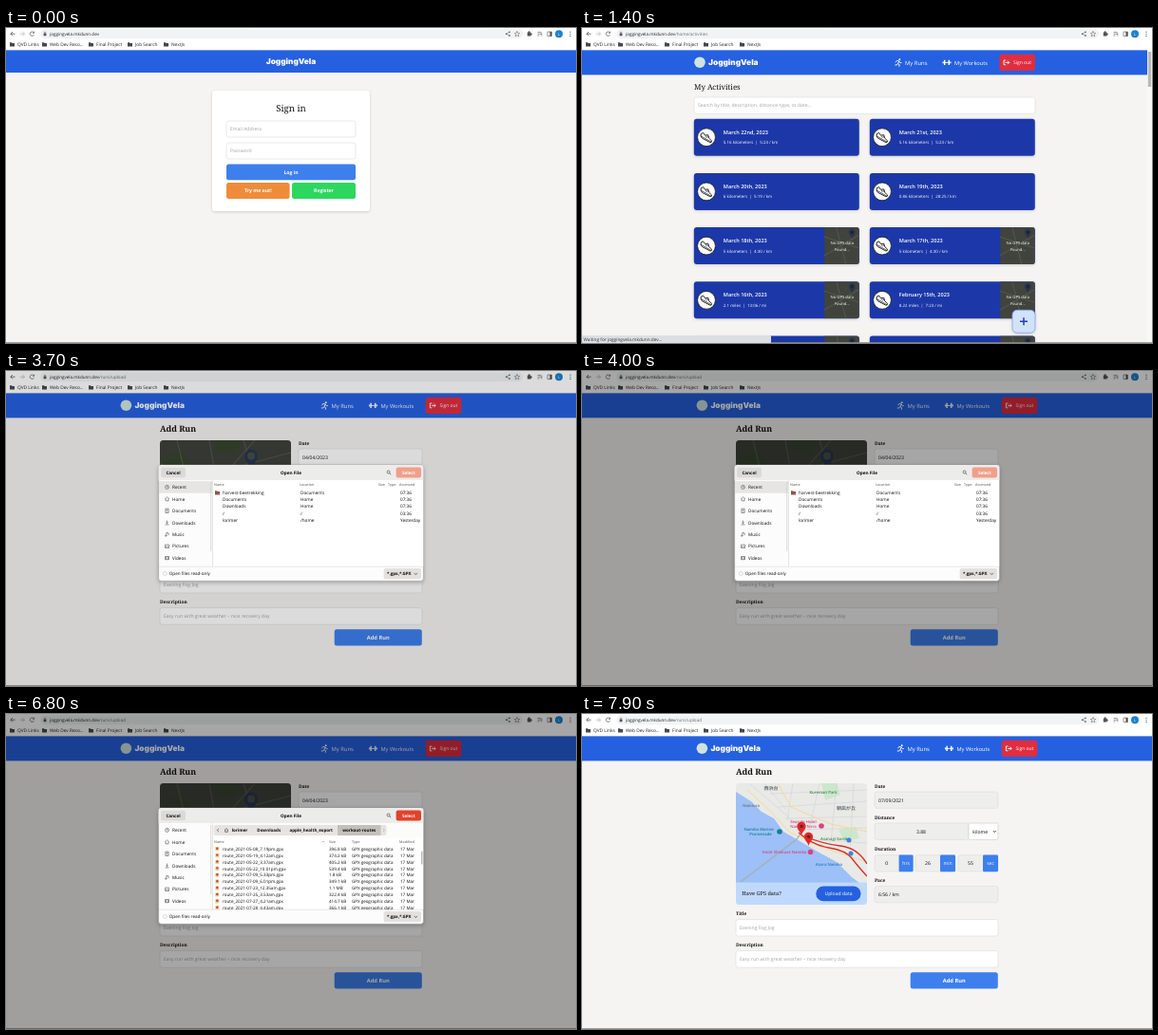
These frames come from a looping animation (600x332 px, 8 s). An HTML page:

```html
<!DOCTYPE html>
<html lang="en">
<head>
<meta charset="utf-8">
<style>
  html, body { margin: 0; width: 100%; height: 100%; overflow: hidden; background: #fff; }
  svg { display: block; width: 600px; height: 332px; }
  text { font-family: "Open Sans", "Noto Sans", "Noto Sans CJK JP", sans-serif; white-space: pre; text-rendering: geometricPrecision; }
  #dialog text { font-weight: 500; }
  .serif { font-family: "Noto Serif", serif; }
  .brand { font-family: Inter, sans-serif; font-weight: 900; }
  text.bold, #dialog text.bold { font-weight: 700; }
  text.semi, #dialog text.semi { font-weight: 600; }
  .mid { text-anchor: middle; }
</style>
</head>
<body>
<svg id="stage" viewBox="0 0 600 332"></svg>
<script>
const HOST = 'joggingvela.mkdunn.dev', BRAND = 'JoggingVela', USER = 'lorimer';
const BLUE = '#2560e0', SKY = '#3e7fee', GREY = '#a0a3a8', INK = '#0c0c0c';

const text = (x, y, s, size = 5.06, fill = INK, cls = '') =>
  `<text x="${x}" y="${y}" font-size="${size}" fill="${fill}" class="${cls}">${s}</text>`;
const rect = (x, y, x2, y2, fill, r = 0, extra = '') =>
  `<rect x="${x}" y="${y}" width="${x2 - x}" height="${y2 - y}" rx="${r}" fill="${fill}" ${extra}/>`;
const circle = (x, y, r, fill, extra = '') => `<circle cx="${x}" cy="${y}" r="${r}" fill="${fill}" ${extra}/>`;
const line = (d, color, w = .8, extra = '') =>
  `<path d="${d}" fill="none" stroke="${color}" stroke-width="${w}" ${extra}/>`;
const shape = (d, fill, extra = '') => `<path d="${d}" fill="${fill}" ${extra}/>`;
const at = (x, y, body) => `<g transform="translate(${x} ${y})">${body}</g>`;
const group = (id, body, extra = '') => `<g id="${id}" ${extra}>${body}</g>`;
const field = (x, y, x2, y2, fill = '#fff') => rect(x, y, x2, y2, fill, 2.5, 'stroke="#d9dbde" stroke-width=".6"');
const button = (x, y, x2, y2, fill, label, size = 5.1, cls = 'bold') =>
  rect(x, y, x2, y2, fill, 2.5) + text((x + x2) / 2, (y + y2) / 2 + size * .36, label, size, '#fff', cls + ' mid');
const folder = (x, y, fill = '#8a5a4c') => shape(`M${x} ${y}h2l.7.8h2.3v3.4h-5z`, fill);
const pin = (x, y, fill, s = 1) =>
  at(x, y, `<g transform="scale(${s})">${shape('M0 0C-1-4-4-5-4-8.5A4 4 0 0 1 4-8.5C4-5 1-4 0 0', fill)}${circle(0, -8.5, 1.6, '#0006')}</g>`);

// Browser frame
function browser() {
  const dark = '#50545a';
  const marks = [[4, 'QVD Links'], [38, 'Web Dev Reso…'], [87, 'Final Project'], [128, 'Job Search'], [166, 'NextJs']];
  return rect(0, 0, 600, 23, '#fff') + rect(36, 1.3, 544, 11.2, '#f1f3f4', 5)
    + line('M9.5 6.2H4.8M7 4L4.8 6.2L7 8.4', dark) + line('M14.8 6.2h4.7M17.3 4l2.2 2.2l-2.2 2.2', '#b4b6b9')
    + line('M29.2 4.8A2.2 2.2 0 1 0 29.5 7M29.7 3.6v1.7h-1.7', dark, .7)
    + rect(39.6, 5.6, 42.4, 8.3, dark, .4) + line('M40.2 5.8V4.9a.8.8 0 0 1 1.6 0v.9', dark, .5)
    + `<text x="46" y="8" font-size="4.6" fill="#222">${HOST}<tspan id="path" fill="#6b6f74"></tspan></text>`
    + line('M530 4.3L526.6 6.2L530 8.1', dark, .5) + circle(530, 4.3, .8, dark) + circle(526.6, 6.2, .8, dark) + circle(530, 8.1, .8, dark)
    + line('M538 3.4l.8 1.9l2 .2l-1.5 1.3l.5 2l-1.8-1.1l-1.8 1.1l.5-2l-1.5-1.3l2-.2z', dark, .5)
    + rect(548.8, 4.6, 552.6, 8.6, dark, .5) + circle(550.6, 4.2, 1, dark) + circle(552.8, 6.6, 1, dark)
    + line('M559.5 4.4h4M559.5 6.2h4M559.5 8h2M563.8 5v3.4', dark, .6)
    + line('M570 4h4.4v4.6H570z', dark, .6) + rect(572.4, 4, 574.4, 8.6, dark)
    + circle(582, 6.3, 4, '#1a82cf') + text(582, 7.7, 'L', 4, '#fff', 'mid')
    + [4.2, 6.3, 8.4].map(y => circle(594, y, .6, dark)).join('')
    + marks.map(([x, s]) => folder(x, 15.2, '#454a50') + text(x + 8, 18.9, s, 4.8, '#222')).join('');
}

function header(dx) {
  const w = '#fff';
  const runner = circle(1.3, -3.2, 1, w) + line('M-3 -.2L-1.6 -2L.8 -1.4L-.6 1.2L1.2 2.2L.8 4.4M-.6 1.2L-1.6 2.6H-3.6M.8 -1.4L1.8 .2H3.4', w, .9);
  const bell = line('M-4 -1v2M4 -1v2M-4 0H4', w, .9) + line('M-2.3 -2.6v5.2M2.3 -2.6v5.2', w, 1.5);
  const exit = line('M-1 -2.4H-3V2.4H-1M-1.5 0H2.6M1 -1.8L2.8 0L1 1.8', w, .9);
  return rect(0, 23.4, 600, 49.4, BLUE) + at(dx, 0,
    circle(124, 36.2, 5.8, '#cfe4de') + text(133, 39.3, BRAND, 8.3, w, 'brand')
    + at(333, 36.4, runner) + text(340, 38.6, 'My Runs', 5.9, w)
    + at(384, 36.4, bell) + text(392, 38.6, 'My Workouts', 5.7, w)
    + rect(439.3, 27.8, 477, 45, '#e02d3f', 3) + at(447, 36.4, exit) + text(454, 38.2, 'Sign out', 5, w));
}

function login() {
  return rect(0, 23.4, 600, 47, BLUE) + text(300, 38.3, BRAND, 8.3, '#fff', 'brand mid')
    + rect(217, 66, 383, 193, '#fff', 3.5, 'filter="url(#soft)"')
    + text(300, 88, 'Sign in', 9.6, '#111', 'serif mid')
    + field(232, 98, 368, 115) + text(236, 108.4, 'Email Address', 5.06, GREY)
    + field(232, 121, 368, 138) + text(236, 131.4, 'Password', 5.06, GREY)
    + button(232, 143.5, 368, 160.3, SKY, 'Log in') + button(232, 163, 298.6, 180, '#ee8c3c', 'Try me out!')
    + button(301, 163, 368, 180, '#2dd75f', 'Register');
}

function activityCard(x, y, [date, detail, noGps]) {
  const shoe = shape('M-6.5 -1.5L-4.5 -3.2L-2 -1.2L1 -2.6L3 .4L6.5 2Q7.2 4 5.4 4.2L-4 2.6Q-6.6 1.4 -6.5 -1.5Z', '#fff', 'stroke="#111" stroke-width=".8"')
    + line('M-6 .8L6.5 3.4M-1 -.8L.6 .8M.4 -1.6L2 0', '#111', .6);
  const map = rect(137.5, 0, 174, 39, '#41433d') + line('M137 10L174 22M150 0L160 39M137 30L174 8', '#52544a', 1.2)
    + pin(166.5, 12, '#26334e', .8)
    + text(156, 18, 'No GPS data', 4.2, '#fff', 'mid') + text(156, 24.6, 'Found...', 4.2, '#fff', 'mid');
  return at(x, y, rect(0, 0, 174, 39, '#1f39a8', 3, 'filter="url(#soft)"')
    + (noGps ? `<g clip-path="url(#card)">${map}</g>` : '')
    + circle(13.2, 19.5, 9.4, '#fff', 'stroke="#111" stroke-width=".7"') + at(13.2, 19.2, `<g transform="rotate(18)">${shoe}</g>`)
    + text(31, 16.2, date, 5.55, '#fff', 'semi') + text(31, 26.6, detail, 4.4, '#fff'));
}

function activities() {
  const cards = [
    ['March 22nd, 2023', '5.16 kilometers  |  5:23 / km'], ['March 21st, 2023', '5.16 kilometers  |  5:23 / km'],
    ['March 20th, 2023', '6 kilometers  |  5:19 / km'], ['March 19th, 2023', '0.86 kilometers  |  28:25 / km'],
    ['March 18th, 2023', '5 kilometers  |  4:30 / km', 1], ['March 17th, 2023', '5 kilometers  |  4:30 / km', 1],
    ['March 16th, 2023', '2.1 miles  |  13:06 / mi', 1], ['February 15th, 2023', '8.22 miles  |  7:23 / mi', 1],
    ['', '', 1], ['', '', 1]];
  return header(0) + text(118, 65, 'My Activities', 7.9, '#111', 'serif')
    + field(118, 73, 477, 90.3) + text(122, 83.4, 'Search by title, description, distance-type, or date...', 5.06, GREY)
    + cards.map((c, i) => activityCard(i % 2 ? 302.8 : 117.8, 95.7 + (i >> 1) * 57.2, c)).join('')
    + rect(453, 297.3, 477, 321.3, '#d2e2fb', 5, 'stroke="#7fa3e6" stroke-width=".8" filter="url(#soft)"')
    + line('M461 309.3h8M465 305.3v8', '#1f3fae', 1.5)
    + rect(595, 23, 600, 332, '#f8f8f8') + rect(595.8, 25, 599.2, 62, '#b9b9b9');
}

function darkMap() {
  return rect(162, 73, 300, 178, '#3e403a')
    + shape('M162 92L186 84L200 104L176 116ZM262 120l30-12l8 26l-30 8ZM222 73h26l-6 14l-22-2Z', '#37442f')
    + line('M162 152Q184 138 196 152T226 156T250 166T300 150', '#29394c', 8)
    + line('M162 122L300 86M180 73L206 178M214 73L232 178M250 73L282 178M162 98L300 142M168 178L262 73M162 140L300 168', '#55574c', 1.1)
    + line('M258 101L246 108L234 106L227 118L229 134L215 144', '#8c2a24', 1.4) + pin(258, 104, '#263552', 1.7)
    + circle(258, 89.6, 4, '#4a4c46')
    + text(231, 128.2, 'No GPS data found...', 6, '#fff', 'mid');
}

function cityMap() {
  const label = (x, y, s, fill, size = 4.2) => text(x, y, s, size, fill, 'semi mid');
  const pink = '#d6447f', teal = '#13808f', slate = '#6b7077';
  return rect(162, 73, 300, 178, '#e9e9e5')
    + shape('M252 73h16l4 12l-16 6ZM270 122l18-3l4 12l-16 3Z', '#cbe8ca')
    + line('M176 73L240 128M192 73L214 100M222 73L216 112M250 73L238 128M268 73L262 136M286 73L282 146M198 84L300 80M206 98L300 92M214 110L300 108M226 122L300 120M240 132L300 136', '#d3d6da', .7)
    + shape('M162 82L178 92L189 103L202 110L212 124L226 132L246 144L268 156L284 172L292 178H162Z', '#9cc0f7')
    + line('M174 80L198 102L218 124L246 138L300 156M206 73L220 98L262 116L300 124', '#f3d99a', 1)
    + line('M234 120L226 132L167 177', '#a9adb0', 1.2)
    + line('M228 125Q242 138 260 141T284 152T300 171M231 128Q254 137 272 139T300 158', '#d3322b', 1.3)
    + label(199, 80, '西浜台', slate, 5) + label(254, 84, 'Kuremari Park', '#3b8a4b') + label(278, 101, '朝凪が丘', slate, 5)
    + label(178, 98, 'Namiura', slate) + label(186, 123, 'Namiko Marine', teal) + label(188, 128, 'Promenade', teal)
    + circle(208, 124, 2.8, teal) + label(233, 115, 'Seaside Hotel', pink) + label(233, 120, 'Namiko Terra', pink)
    + circle(252, 118, 2.8, pink) + label(267, 133, 'Asanagi Garden', '#3b8a4b') + circle(281, 133, 2.5, '#4b7fd6')
    + label(213, 147, 'Hotel Shiokaze Namiko', pink) + circle(240.5, 145.5, 2.8, pink)
    + label(260, 160, 'Azora Namiko', '#2f78c4') + circle(283, 147, 2.5, '#3f86d8')
    + pin(231, 128, '#dc2a2a', 1.15) + pin(238.5, 139, '#dc2a2a', 1.15);
}

function runForm(done) {
  const bg = done ? '#eeeeec' : '#fff', ink = done ? INK : GREY;
  const label = (x, y, s) => text(x, y, s, 4.85, '#111', 'serif semi');
  const units = [[308, 333.6, 348.6, 'hrs', done ? '0' : '00'], [351, 377, 393, 'min', done ? '26' : '40'], [396, 422, 438, 'sec', done ? '55' : '00']];
  return `<g clip-path="url(#mapCard)">${done ? cityMap() : darkMap()}${rect(162, 177.6, 300, 201, '#bfd9fc')}</g>`
    + text(168.3, 191.2, 'Have GPS data?', 5.6, '#111', 'serif')
    + rect(246.3, 181.5, 293.5, 197.3, BLUE, 7.9) + text(270, 191.2, 'Upload data', 5.1, '#fff', 'mid')
    + label(308, 77.5, 'Date') + field(308, 82, 438, 99.3, bg) + text(312, 92.6, done ? '07/09/2021' : '04/04/2023')
    + label(308, 110.5, 'Distance') + field(308, 115, 407, 132.4, bg) + text(357, 125.6, done ? '3.88' : '0.00', 5.06, ink, 'mid')
    + rect(407, 115, 438, 132.4, '#fff', 1.5, `stroke="${done ? '#c4c8ca' : '#6f8580'}" stroke-width=".6"`)
    + text(411.3, 125.6, done ? 'kilome' : 'miles') + line('M432.8 123l1.5 1.6l1.5-1.6', '#222', .8)
    + label(308, 143.5, 'Duration')
    + units.map(([x, m, x2, unit, v]) => field(x, 148.7, x2, 166, bg) + rect(m, 148.4, x2, 166.2, SKY, 1.2)
      + text((x + m) / 2, 159.2, v, 5.06, ink, 'mid') + text((m + x2) / 2, 159.2, unit, 5.06, '#fff', 'mid')).join('')
    + label(308, 176.6, 'Pace') + field(308, 181.4, 438, 198.8, bg) + text(312, 192, done ? '6:56 / km' : '0:00 / mi')
    + label(162, 211.6, 'Title') + field(162, 216.5, 438, 234) + text(166, 227, 'Evening Fog Jog', 5.06, GREY)
    + label(162, 244.8, 'Description') + field(162, 249.6, 438, 267.2)
    + text(166, 260.2, 'Easy run with great weather – nice recovery day', 5.06, GREY)
    + button(345.7, 272.2, 437.8, 289.4, SKY, 'Add Run', 5.7);
}

// File chooser
function dialogShell() {
  const places = ['Recent', 'Home', 'Documents', 'Downloads', 'Music', 'Pictures', 'Videos'];
  const icons = ['M-2 0a2 2 0 1 0 4 0a2 2 0 1 0-4 0M0-1.2V0H1', 'M-2.2 0L0-2L2.2 0M-1.5-.4V2H1.5V-.4', 'M-1.6-2.2H1.6V2.2H-1.6ZM-.8-.8H.8M-.8.6H.8',
    'M0-2.2V1M-1.3-.2L0 1L1.3-.2M-2 2.2H2', 'M-.6 1.5V-2L1.6-1.4V1M-.6 1.4a.7.7 0 1 0-1.4 0a.7.7 0 1 0 1.4 0', 'M-2-1.6H2V1.8H-2ZM-1.6 1.4L0-.2L1.6 1.4', 'M-2-1.6H2V1.6H-2ZM-1-1.6V1.6M1-1.6V1.6'];
  return rect(160.6, 99, 439.4, 221.3, '#fcfcfc', 3, 'stroke="#8a8a8a" stroke-width=".5" filter="url(#deep)"')
    + shape('M160.6 115V102a3 3 0 0 1 3-3H436.4a3 3 0 0 1 3 3V115Z', '#ececea')
    + rect(163, 101.8, 189, 112.3, '#dcdad8', 2) + text(176, 108.7, 'Cancel', 4.6, INK, 'bold mid')
    + text(300, 108.8, 'Open File', 4.7, INK, 'bold mid')
    + circle(402.6, 106.5, 1.5, 'none', 'stroke="#333" stroke-width=".6"') + line('M403.7 107.7l1.5 1.5', '#333', .7)
    + `<rect id="select" x="410.6" y="101.6" width="26.4" height="10.9" rx="2"/>` + text(423.8, 108.8, 'Select', 4.6, '#fff', 'bold mid')
    + `<rect id="place" x="161" width="56" height="12.6" fill="#e6e5e4"/>`
    + places.map((s, i) => line(icons[i], '#555', .6, `transform="translate(169.5 ${122.4 + i * 12.45})"`) + text(175, 124.2 + i * 12.45, s, 4.7)).join('')
    + rect(215.4, 117, 216.2, 190, '#cfcfcf', .4) + rect(217.5, 115, 439.2, 206, '#fff') + line('M217.5 115V206M161 206.2H439', '#d0cecb', .5)
    + rect(165.6, 211.7, 169, 215.1, '#fff', .8, 'stroke="#bbb" stroke-width=".5"') + text(171.8, 215.1, 'Open files read-only', 4.6)
    + rect(397.6, 208, 437, 219.3, '#e3e1df', 2) + text(401, 215.2, '*.gpx,*.GPX', 4.5, INK, 'bold') + line('M429.6 212.9l1.7 1.7l1.7-1.7', '#333', .7);
}

const columns = (y, cols) => cols.map(([x, s]) => text(x, y, s, 3.7, '#777', 'semi')).join('');

function crumbs(items) {
  const end = items[items.length - 1][1];
  return rect(218, 115, 439, 130.5, '#fbfbfa') + rect(218.5, 117, end + 6, 128, '#e6e4e2', 2)
    + line('M224 120.8l-1.7 1.7l1.7 1.7', '#333', .6) + line(`M${end + 2.4} 120.8l1.7 1.7l-1.7 1.7`, '#aaa', .6)
    + line('M230 122.5L232 120.6L234 122.5M230.7 122v2.3H233.3V122', '#333', .6)
    + items.map(([x, x2, s], i) => (i === items.length - 1 ? rect(x, 117, x2, 128, '#c3c0bc') : '')
      + text((x + x2) / 2 + (i ? 0 : 3.5), 124.2, s, 4.5, INK, 'bold mid')).join('');
}

function recentList() {
  const rows = [['harvest-beetrekking', 'Documents', '07:36'], ['Documents', 'Home', '07:36'], ['Downloads', 'Home', '07:36'], ['/', '/', '03:36'], [USER, '/home', 'Yesterday']];
  return columns(121.3, [[219, 'Name'], [309, 'Location'], [392, 'Size'], [402, 'Type'], [414, 'Accessed']]) + folder(220, 126.2)
    + rows.map(([a, b, c], i) => [[228, a], [310, b], [415, c]].map(([x, s]) => text(x, 130.2 + i * 7.1, s, 4.7)).join('')).join('');
}

function folderList(path, name) {
  return crumbs(path) + columns(136.3, [[219, 'Name'], [377, 'Size'], [395, 'Type'], [414, 'Modified']]) + line('M369.8 135.3l1.3-1.3l1.3 1.3', '#777', .5)
    + rect(218, 140, 439, 147, '#efeeec', 0, 'stroke="#e36a55" stroke-width=".5"') + line('M218 130.5H439V206H218Z', '#e36a55', .6)
    + folder(220.3, 141.4) + text(228, 145.2, name, 4.6) + text(415, 145.2, 'Yesterday', 4.7);
}

const PITCH = 6.89, SCROLLED = 6;
function routeList(path) {
  const shown = ['05-08_7.19pm 396.8 kB', '05-19_4.12am 374.2 kB', '05-22_3.37am 405.2 kB', '05-22_10.01pm 539.4 kB', '07-09_5.33pm 1.8 kB',
    '07-09_6.01pm 349.1 kB', '07-23_12.35am 1.1 MB', '07-25_3.53am 322.4 kB', '07-27_4.21am 414.7 kB', '07-28_4.43am 366.1 kB'];
  const earlier = Array.from({ length: SCROLLED }, (_, i) => `04-${11 + i * 3}_${2 + i * 5 % 9}.${17 + i * 7}am ${312 + i * 47 % 170}.${i + 2} kB`);
  const row = (s, i) => {
    const y = 143.9 + i * PITCH, [name, ...size] = s.split(' ');
    return rect(220.3, y - 4, 224.3, y + .4, '#e9cf9a', .5) + circle(222.3, y - 2.2, 1.2, '#c9462f')
      + text(228, y, `route_2021-${name}.gpx`, 4.55) + text(340, y, size.join(' '), 4.55) + text(364, y, 'GPX geographic data', 4.5) + text(415, y, '17 Mar', 4.55);
  };
  return crumbs(path) + columns(136.3, [[219, 'Name'], [340, 'Size'], [364, 'Type'], [414, 'Modified']]) + line('M332.8 135.3l1.3-1.3l1.3 1.3', '#777', .5)
    + `<g clip-path="url(#list)">${group('rows', [...earlier, ...shown].map(row).join(''))}</g>`
    + `<rect id="thumb" x="437.2" width="1.2" height="14" rx=".6" fill="#aaa"/>`;
}

const home = [227, 258, USER];
const exportPath = [home, [259, 294.5, 'Downloads'], [295, 347.5, 'apple_health_export']];
const clip = (id, shapeBody) => `<clipPath id="${id}">${shapeBody}</clipPath>`;
const shadow = (id, dy, blur, a) => `<filter id="${id}" x="-20%" y="-20%" width="140%" height="150%"><feDropShadow dx="0" dy="${dy}" stdDeviation="${blur}" flood-opacity="${a}"/></filter>`;

document.getElementById('stage').innerHTML =
  `<defs>${shadow('soft', 1, 1.4, .16)}${shadow('deep', 1.5, 2, .28)}${clip('card', rect(0, 0, 174, 39, '#000', 3))}`
  + `${clip('mapCard', rect(162, 73, 300, 201, '#000', 3.5))}${clip('list', rect(218, 138, 439, 206, '#000'))}</defs>`
  + rect(0, 0, 600, 332, '#f5f4f2') + group('login', login()) + group('activities', activities())
  + group('upload', header(2.4) + text(162, 64, 'Add Run', 8.8, '#111', 'serif bold') + group('blank', runForm(false)) + group('filled', runForm(true)))
  + browser() + rect(0, 331.2, 600, 332, '#8b8b8b')
  + group('status', rect(0, 324, 199, 332, '#dcdfe3', 1) + '<text id="statusText" x="1.5" y="329.7" font-size="4.75" fill="#333"></text>')
  + `<rect id="dim" width="600" height="332"/>`
  + group('dialog', dialogShell() + group('recent', recentList())
    + group('downloads', folderList([home, [259, 294.5, 'Downloads']], 'apple_health_export'))
    + group('export', folderList(exportPath, 'workout-routes'))
    + group('routes', routeList([...exportPath, [349, 394.5, 'workout-routes']])));

const $ = id => document.getElementById(id);
const show = (id, on) => $(id).style.display = on ? '' : 'none';
const ramp = (t, a, b) => Math.min(1, Math.max(0, (t - a) / (b - a)));

function draw(t) {
  const within = (a, b) => t >= a && t < b;
  show('login', t < 1000);
  show('activities', within(1000, 2500));
  show('upload', t >= 2500);
  show('blank', t < 7500);
  show('filled', t >= 7500);
  $('path').textContent = t < 1000 ? '' : t < 2500 ? '/home/activities' : '/runs/upload';

  show('status', within(1000, 3000));
  $('statusText').textContent = t < 1800 ? `Waiting for ${HOST}...` : `https://${HOST}/runs/upload`;

  $('dim').setAttribute('opacity', .35 * (ramp(t, 3500, 4000) - ramp(t, 7100, 7500)));
  show('dialog', within(3500, 7200));
  show('recent', t < 4600);
  show('downloads', within(4600, 5300));
  show('export', within(5300, 5800));
  show('routes', t >= 5800);
  $('select').setAttribute('fill', t < 4600 ? '#efa08b' : '#e0432c');
  $('place').setAttribute('y', t < 4600 ? 116.1 : 153.5);
  show('place', t < 5300);

  const p = ramp(t, 6100, 6700), scroll = SCROLLED * p * p * (3 - 2 * p);
  $('rows').setAttribute('transform', `translate(0 ${-scroll * PITCH})`);
  $('thumb').setAttribute('y', 138.5 + scroll);
}

function tick() {
  draw(Math.floor(performance.now() % 8000 / 100) * 100);
  requestAnimationFrame(tick);
}
tick();
</script>
</body>
</html>
```
